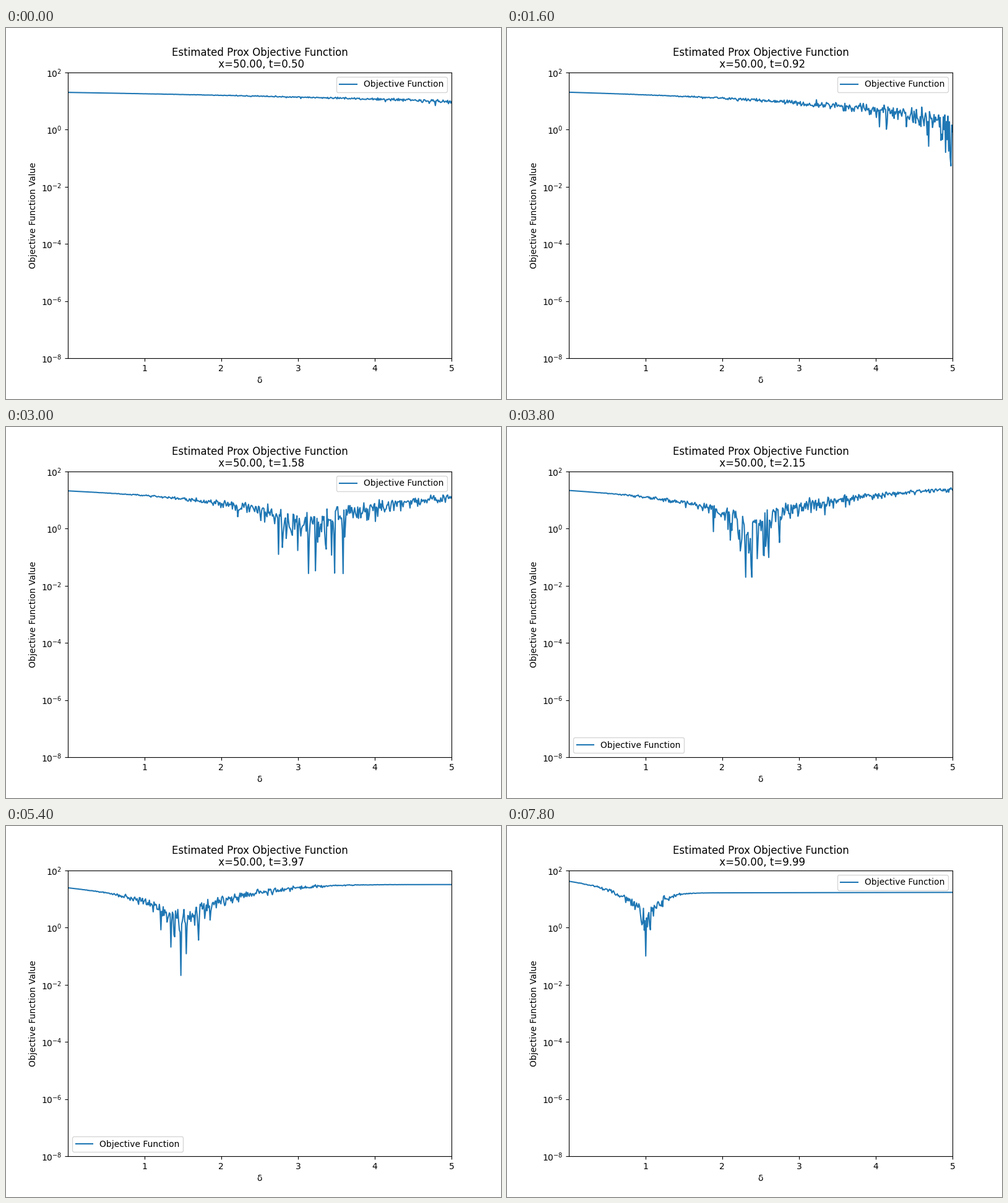
A matplotlib script for the animation above (8 s loop, 800 by 600 pixels).

```python
import numpy as np
import matplotlib.pyplot as plt
from matplotlib.animation import FuncAnimation
from matplotlib.ticker import NullLocator

FRAMES, INTERVAL = 40, 200
TIMES = np.geomspace(0.5, 1000, 100)[:FRAMES]
DELTA = np.linspace(0.003, 5, 500)
SLOPE, BEND = 4.24, 1.1


def objective(step):
    t = TIMES[step]
    u = DELTA * t
    growth = t**1.65
    start = 20 + 0.5 * growth
    depth = 36.5 - 0.45 * growth
    knee = (start + depth) / SLOPE

    # A falling ramp that bends into a plateau below zero
    clean = SLOPE * BEND * np.logaddexp(0, (knee - u) / BEND) - depth
    clean -= 0.02 * np.maximum(u - knee, 0)

    # Noise grows with the variance, then dies out on the plateau
    spread = 2.4 * u**2 / (u**2 + 12) / (1 + np.exp((u - knee) / BEND))
    noise = spread * np.random.default_rng(step).normal(size=u.size)
    noise[np.abs(clean).argmin()] = 0  # keep the zero crossing sharp
    return np.maximum(np.abs(clean + noise), 0.02)


fig, ax = plt.subplots(figsize=(8, 6), dpi=100)
line, = ax.plot(DELTA, objective(0), label="Objective Function")
ax.set_yscale("log")
ax.set_xlim(DELTA[0], DELTA[-1])
ax.set_ylim(1e-8, 1e2)
ax.set_xticks(range(1, 6))
ax.set_yticks([10.0**p for p in range(-8, 3, 2)])
ax.yaxis.set_minor_locator(NullLocator())
ax.set_xlabel("δ")
ax.set_ylabel("Objective Function Value")
title = ax.set_title("", linespacing=1.08, pad=5.5)
high = ax.legend(loc="upper right")
ax.add_artist(high)
low = ax.legend(loc="lower left")


def update(step):
    line.set_ydata(objective(step))
    title.set_text("Estimated Prox Objective Function\n"
                   f" x=50.00, t={TIMES[step]:.2f}")
    # The legend moves down while the curve's right end runs behind it
    crowded = 19 <= step <= 37
    high.set_visible(not crowded)
    low.set_visible(crowded)
    return line, title, high, low


anim = FuncAnimation(fig, update, frames=FRAMES, interval=INTERVAL,
                     repeat=True, repeat_delay=0, blit=False)
plt.show()
```
